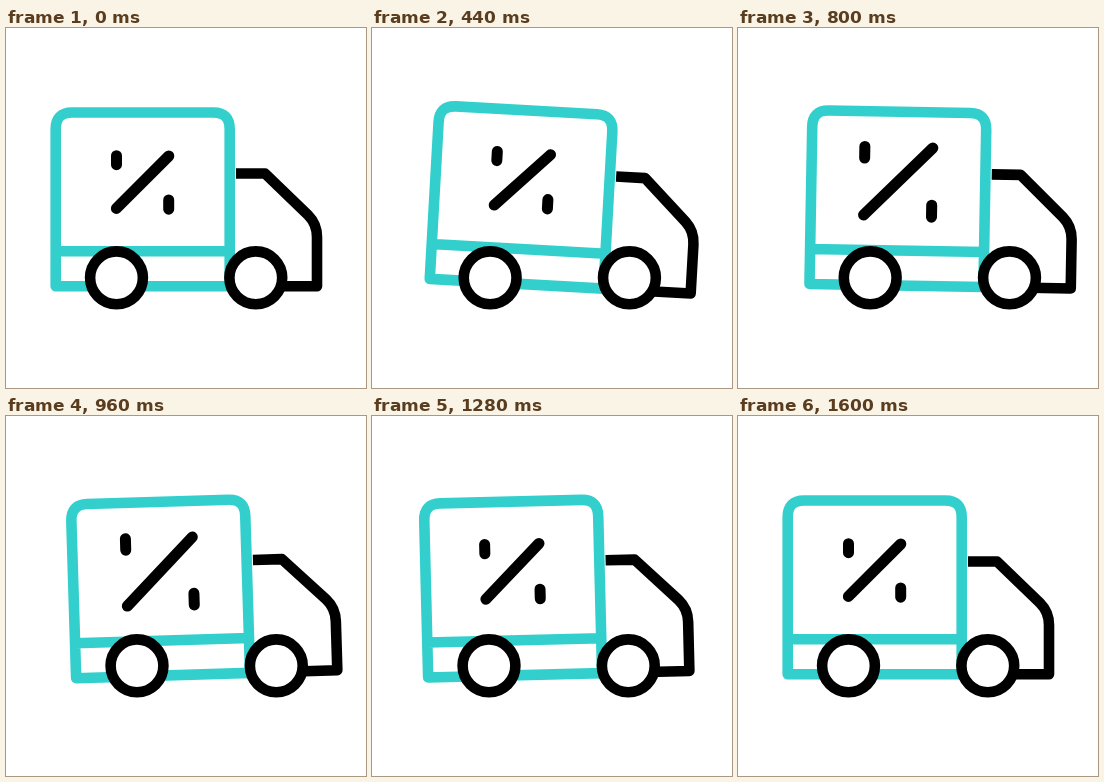
An HTML page that plays this animation: 360 by 360 pixels, repeating every 1720 ms.

```html
<!DOCTYPE html>
<html lang="en">
<head>
<meta charset="utf-8">
<title>Discount delivery</title>
<style>
  html, body { margin: 0; height: 100%; overflow: hidden; background: #fff; }
  svg { display: block; width: 100%; height: 100%; }
  path, circle { stroke: #000; stroke-width: 10.6; stroke-linejoin: round; fill: none; }
  .box { stroke: #33cfcc; }
  .wheel { fill: #fff; }
  #percent path { stroke-width: 11; stroke-linecap: round; vector-effect: non-scaling-stroke; }
</style>
</head>
<body>
<svg viewBox="0 0 360 360">
  <g id="truck">
    <g id="body">
      <path d="M230 145.5H259L302 187Q311 196 311 209V258.2H270"/>
      <path class="box" d="M49.7 258.2V101Q49.7 84.5 66 84.5H207.5Q223.7 84.5 223.7 101V258.2ZM49.7 223.3H223.7"/>
      <g id="percent">
        <path d="M-26.2 26.2L26.2 -26.2M-26.1 -26.5V-17.5M26.1 17.8V27"/>
      </g>
    </g>
    <circle class="wheel" cx="110.5" cy="249.8" r="26.4"/>
    <circle class="wheel" cx="249.8" cy="249.8" r="26.4"/>
  </g>
</svg>
<script>
const LOOP = 1720, STEP = 40, KEY_GAP = 160;

// Key values, one every KEY_GAP ms
const shift = [0, .35, 2.7, 9.7, 19.5, 21.7, 20.5, 15.5, 6.5, 1.3, 0];
const tilt = [0, 0, 1.4, 3.65, 3.75, 1, -1.75, -2, -1.42, -.4, 0];
const growth = [0, 0, .005, .035, .17, .3, .28, .15, .04, .005, 0];

// Smooth (Catmull-Rom) curve through the keys
function sample(keys, time) {
  const pos = Math.min(time / KEY_GAP, keys.length - 1);
  const i = Math.floor(pos), u = pos - i;
  const at = n => keys[Math.max(0, Math.min(n, keys.length - 1))];
  const a = at(i), b = at(i + 1);
  const slopeA = (b - at(i - 1)) / 2, slopeB = (at(i + 2) - a) / 2;
  const blend = u * u * (3 - 2 * u);
  return a + (b - a) * blend + u * (1 - u) * (slopeA * (1 - u) - slopeB * u);
}

const [truck, body, percent] = ["truck", "body", "percent"].map(id => document.getElementById(id));

function draw(now) {
  const time = Math.floor((now % LOOP) / STEP) * STEP;
  truck.setAttribute("transform", `translate(${sample(shift, time)} 0)`);
  body.setAttribute("transform", `rotate(${sample(tilt, time)} 180 262)`);
  percent.setAttribute("transform", `translate(136.6 154.2) scale(${1 + sample(growth, time)})`);
}

let start;
function tick(now) {
  start ??= now;
  draw(now - start);
  requestAnimationFrame(tick);
}
draw(0);
requestAnimationFrame(tick);
</script>
</body>
</html>
```
